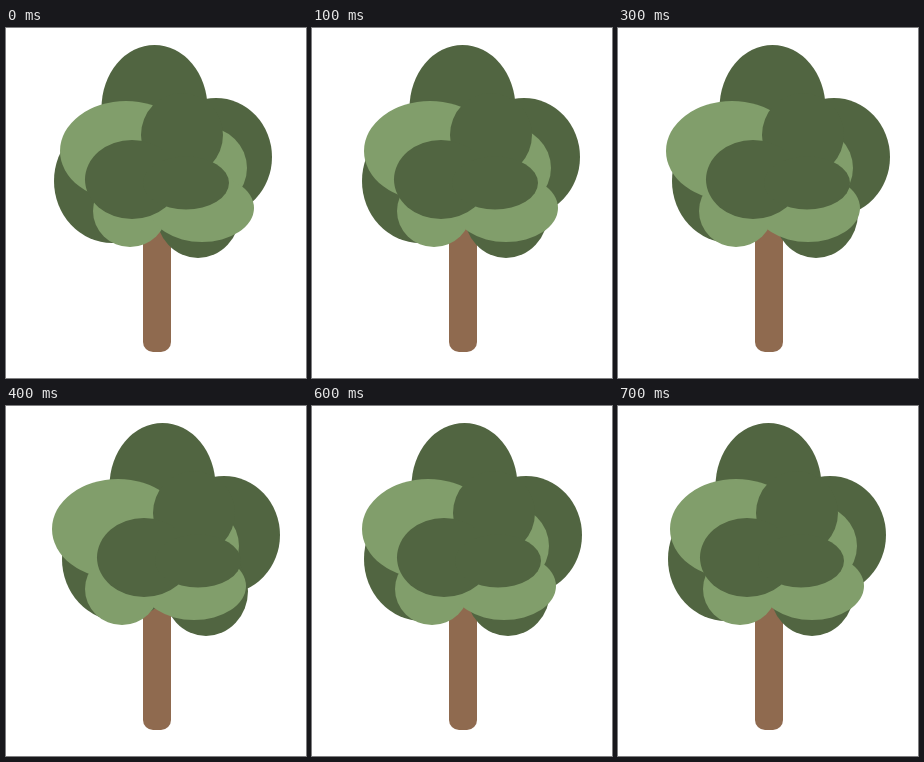
Write an HTML page that moves like this. It is 300 px wide and 350 px high and loops after 800 ms.

```html
<!DOCTYPE html>
<html lang="en">
<head>
<meta charset="utf-8">
<title>Swaying tree</title>
<style>
  html, body { margin: 0; width: 100%; height: 100%; overflow: hidden; background: #fff; }
  svg { display: block; width: 100%; height: 100%; }
  .dark { fill: #516541; }
  .light { fill: #819e6b; }
</style>
</head>
<body>
<svg viewBox="0 0 300 350">
  <rect x="137" y="150" width="28" height="174" rx="10" fill="#8f6a4f"/>
  <g id="back" class="dark">
    <ellipse cx="148.5" cy="80" rx="53" ry="63"/>
    <ellipse cx="210" cy="129" rx="56" ry="59"/>
    <ellipse cx="106" cy="153" rx="58" ry="62"/>
    <ellipse cx="192" cy="185" rx="42" ry="45"/>
  </g>
  <g id="middle" class="light">
    <ellipse cx="120" cy="123" rx="66" ry="50"/>
    <ellipse cx="199" cy="140" rx="42" ry="41"/>
    <ellipse cx="124" cy="183" rx="37" ry="36"/>
    <ellipse cx="196" cy="180" rx="52" ry="34"/>
  </g>
  <g id="front" class="dark">
    <ellipse cx="176" cy="107" rx="41" ry="42"/>
    <ellipse cx="126" cy="151.5" rx="47" ry="39.5"/>
    <ellipse cx="180" cy="155" rx="43" ry="26.5"/>
  </g>
</svg>
<script>
  const STEP = 100, STEPS = 8;
  // Horizontal shift of each leaf layer per step
  const speeds = { back: 2, middle: -2, front: 3 };
  const layers = Object.entries(speeds).map(([id, speed]) => [document.getElementById(id), speed]);
  let start;

  function draw(now) {
    start ??= now;
    const step = Math.floor((now - start) / STEP) % STEPS;
    const sway = Math.min(step, STEPS - step);
    for (const [layer, speed] of layers) {
      layer.setAttribute('transform', `translate(${speed * sway} 0)`);
    }
    requestAnimationFrame(draw);
  }
  requestAnimationFrame(draw);
</script>
</body>
</html>
```
